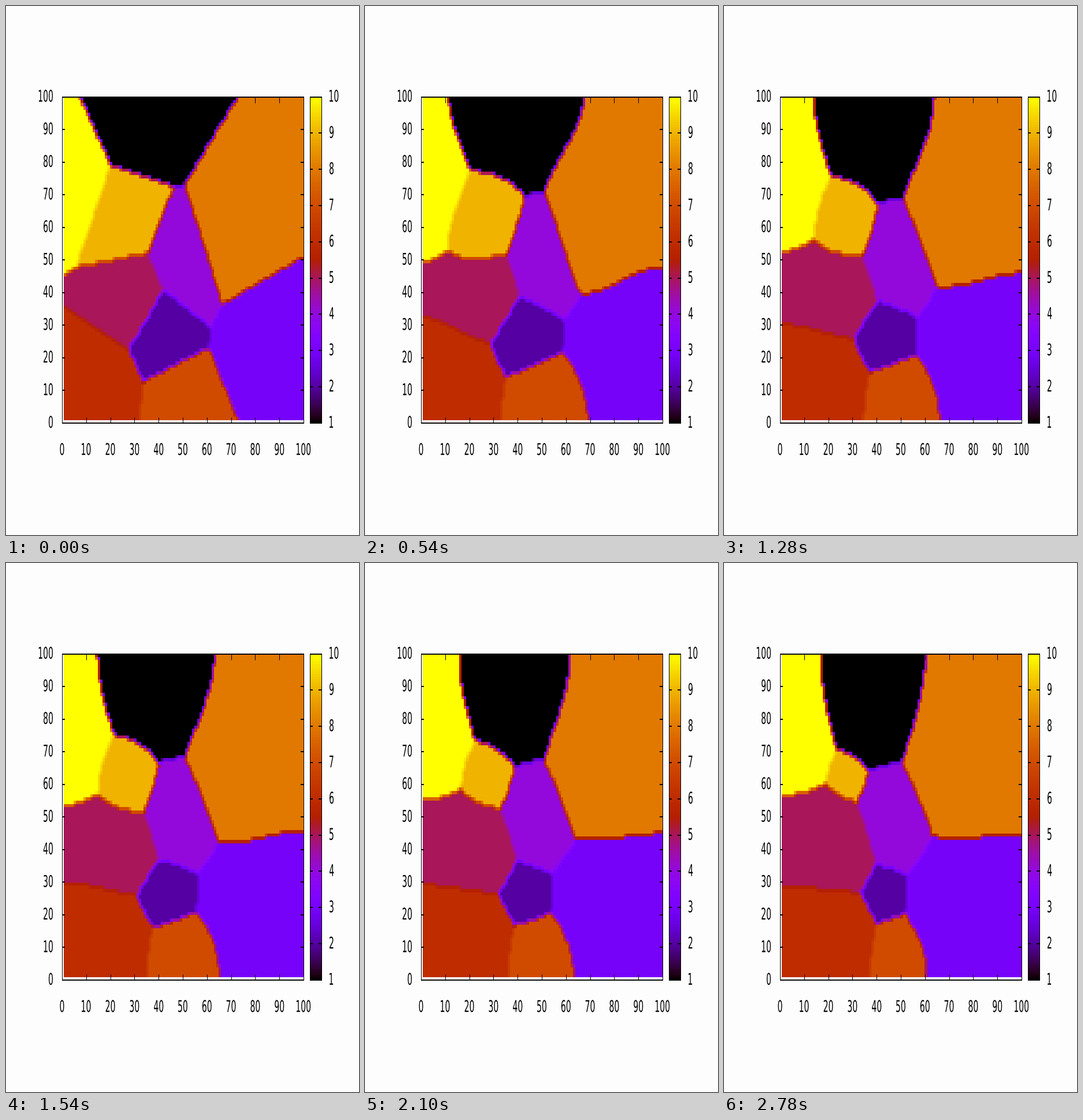
These frames come from a looping animation (611x917 px, 2880 ms). A matplotlib script:

```python
import numpy as np
import matplotlib.pyplot as plt
from matplotlib.animation import FuncAnimation
from matplotlib.collections import LineCollection
from matplotlib.patches import PathPatch
from matplotlib.path import Path
from matplotlib.textpath import TextPath
from matplotlib.transforms import Affine2D

W, H, DPI = 611, 917, 64
PT = 72 / DPI                                # points per pixel
BACK = "#fdfdfd"
LEFT, RIGHT, TOP, BOTTOM = 97, 515, 157.6, 722.9
BAR_L, BAR_R = 526, 546
FONT_PX, TALL = 14, 2.0                      # the whole plot is drawn tall

N, STATES = 100, 60
KAPPA, DT, STEPS = 2.0, 0.1, 21

# Corners of the starting grains, in axis units
PTS = dict(
    a=(0, 0), b=(101, 0), c=(101, 101), d=(0, 101),
    t=(7.0, 101), u=(73.7, 101), e=(0, 44.8), n=(0, 36.3),
    o=(32.1, 0), p=(73.6, 0), j=(101, 51.4),
    A=(20.4, 79.1), B=(46.4, 72.6), C=(51.1, 73.1), D=(6.0, 47.7),
    F=(35.7, 52.2), G=(42.2, 40.8), S=(61.7, 29.5), I=(66.6, 36.5),
    K=(60.8, 23.2), L=(34.0, 12.9), M=(27.8, 22.5),
)
GRAINS = ["tABCu", "MGSKL", "pKSIjb", "BCISGF", "eDFGMn",
          "nMLoa", "oLKp", "uCIjc", "ABFD", "dtADe"]


def start_fields():
    xs = np.arange(1, N + 1)
    gx, gy = np.meshgrid(xs + 0.0013, xs + 0.0029)
    grid = np.column_stack([gx.ravel(), gy.ravel()])
    cells = [Path([PTS[k] for k in g]).contains_points(grid) for g in GRAINS]
    return np.array(cells, dtype=np.float32).reshape(len(GRAINS), N, N)


def relax(eta):
    """One explicit step of multi-phase Allen-Cahn with no-flux walls."""
    p = np.pad(eta, ((0, 0), (1, 1), (1, 1)), mode="edge")
    lap = (p[:, 2:, 1:-1] + p[:, :-2, 1:-1]
           + p[:, 1:-1, 2:] + p[:, 1:-1, :-2] - 4 * eta)
    sq = eta * eta
    return eta + DT * (eta * (1 + 2 * sq - 3 * sq.sum(axis=0)) + KAPPA * lap)


def quads(eta):
    """Grain number averaged over the four corners of each quad."""
    g = eta.argmax(axis=0) + 1.0
    return (g[1:, 1:] + g[1:, :-1] + g[:-1, 1:] + g[:-1, :-1]) / 4


def grow():
    eta = start_fields()
    maps = [quads(eta)]
    for _ in range(STATES - 1):
        for _ in range(STEPS):
            eta = relax(eta)
        maps.append(quads(eta))
    return maps


def px(x):
    return LEFT + (RIGHT - LEFT) * x / 100


def py(y):
    return BOTTOM - (BOTTOM - TOP) * y / 100


def label(ax, text, x, y, align):
    """Digits centred on y; align is 0 left, 0.5 centre, 1 right."""
    path = TextPath((0, 0), text, size=FONT_PX)
    box = path.get_extents()
    move = (Affine2D()
            .translate(-box.x0 - align * box.width, -0.365 * FONT_PX)
            .scale(1, -TALL).translate(x, y))
    ax.add_patch(PathPatch(move.transform_path(path), fc="black", lw=0))


def lines(ax, segs, width):
    ax.add_collection(LineCollection(segs, colors="black",
                                     linewidths=width * PT, zorder=3))


def frame_box(ax, left, right):
    lines(ax, [[(x, TOP), (x, BOTTOM)] for x in (left, right)], 1)
    lines(ax, [[(left, y), (right + 1, y)] for y in (TOP, BOTTOM)], 1.9)


def side_ticks(ax, left, right, y, size):
    lines(ax, [[(left, y), (left + size, y)],
               [(right - size, y), (right, y)]], 1.9)


plt.rcParams["font.family"] = "DejaVu Sans"
fig = plt.figure(figsize=(W / DPI, H / DPI), dpi=DPI, facecolor=BACK)
ax = fig.add_axes([0, 0, 1, 1])

maps = grow()
style = dict(cmap="gnuplot", vmin=1, vmax=10, origin="lower",
             interpolation="nearest", aspect="auto")
# Quads overlap the outer edge of the data by about one pixel
image = ax.imshow(maps[0], extent=(px(1) - 1, RIGHT, py(1) + 1, TOP), **style)
ax.imshow(np.linspace(1, 10, 128)[:, None],
          extent=(BAR_L, BAR_R, BOTTOM, TOP), **style)

frame_box(ax, LEFT, RIGHT)
frame_box(ax, BAR_L, BAR_R)
for v in range(0, 101, 10):
    label(ax, str(v), px(v), 768, 0.5)
    label(ax, str(v), 81, py(v) - 2, 1)
    if 0 < v < 100:
        lines(ax, [[(px(v), TOP), (px(v), TOP + 10)],
                   [(px(v), BOTTOM - 10), (px(v), BOTTOM)]], 1)
        side_ticks(ax, LEFT, RIGHT, py(v), 5)
for v in range(1, 11):
    y = py((v - 1) * 100 / 9)
    label(ax, str(v), 560, y - 2, 0)
    if 1 < v < 10:
        side_ticks(ax, BAR_L, BAR_R, y, 5)

ax.set_xlim(0, W)
ax.set_ylim(H, 0)
ax.axis("off")

# Every third state, and the last one, is held for five ticks of 20 ms
holds = [5 if i % 3 == 1 or i == STATES - 1 else 1 for i in range(STATES)]
order = np.repeat(np.arange(STATES), holds)


def draw(i):
    image.set_data(maps[order[i]])
    return (image,)


anim = FuncAnimation(fig, draw, frames=len(order), interval=20,
                     repeat=True, repeat_delay=0, blit=False)
plt.show()
```
